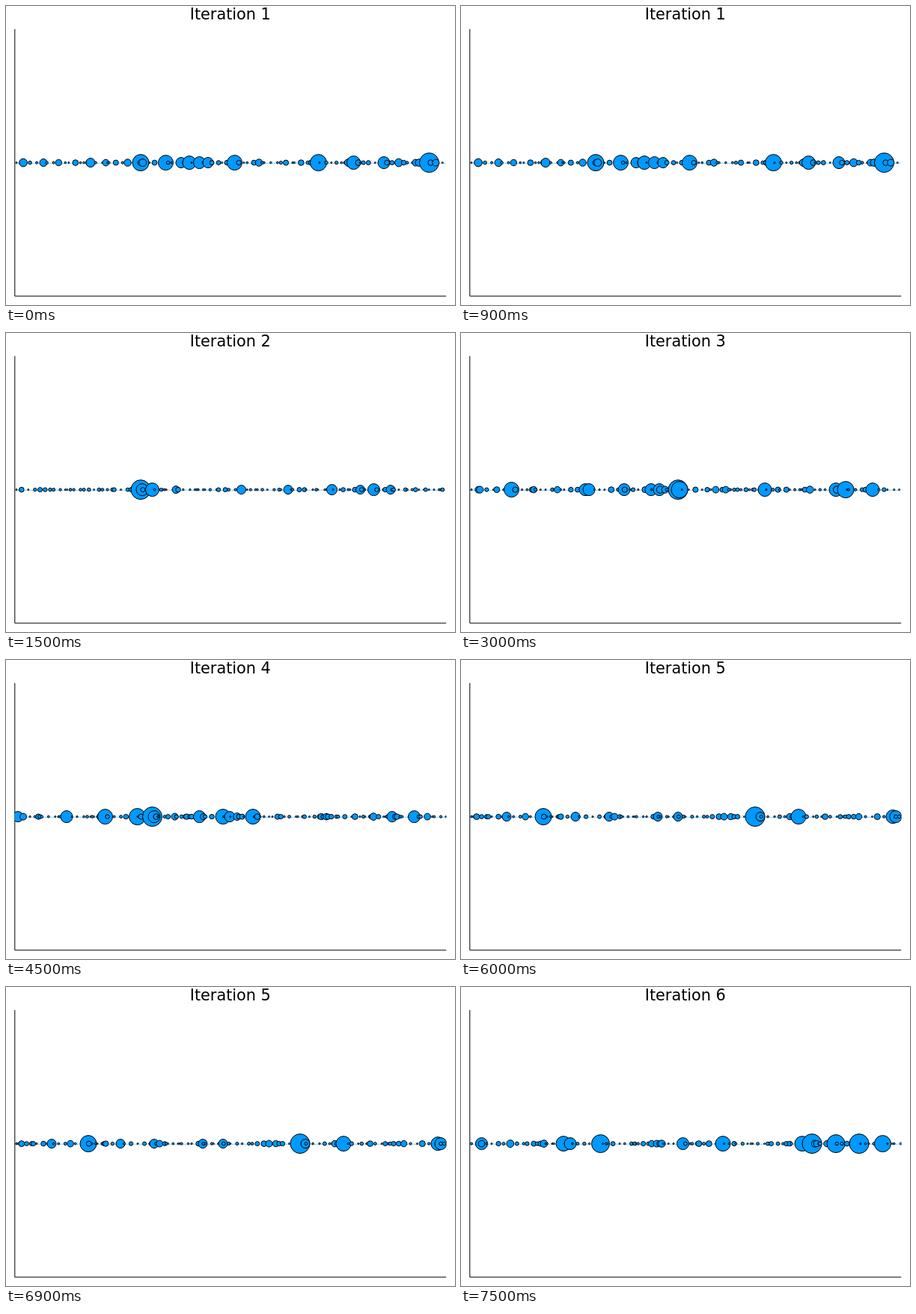
Animation, 600 px wide and 400 px high, one loop 8 s. Source, as an HTML page:

```html
<!DOCTYPE html>
<html lang="en">
<head>
<meta charset="utf-8">
<title>Iterations</title>
<style>
html, body { margin: 0; width: 100%; height: 100%; overflow: hidden; background: #fff; }
svg { display: block; width: 600px; height: 400px; }
text { font: 20.8px "DejaVu Sans", sans-serif; text-anchor: middle; }
.axes { fill: none; stroke: #000; }
.base { stroke: #09f; stroke-dasharray: 1 1.25; }
circle { fill: #09f; stroke: #000; }
</style>
</head>
<body>
<svg viewBox="0 0 600 400">
  <defs><clipPath id="plot"><rect x="11.5" y="31" width="577" height="357"/></clipPath></defs>
  <text id="title" x="299.8" y="18.3"></text>
  <path class="axes" d="M11.8 30.8V388.1H588.2"/>
  <g clip-path="url(#plot)">
    <path class="base" d="M11.8 210.3H588"/>
    <g id="marks"></g>
  </g>
</svg>
<script>
const STEP = 1500, LOOP = 8000;
const LEFT = 11.8, RIGHT = 588, BASE_Y = 209.6, SLOT = 2.25;
const title = document.getElementById("title");
const marks = document.getElementById("marks");

// Dominant circles of each iteration as [x, radius];
// spread is the largest extra radius of the small circles between them.
const iterations = [
  { spread: 4.5, peaks: [[113, 6], [180, 11], [213.5, 10], [234, 7], [245, 9], [258.5, 8], [270, 7], [305.5, 10], [417.5, 11], [464.5, 9], [505, 8], [565.5, 13]] },
  { spread: 2.5, peaks: [[180, 13], [182, 8], [195.5, 9], [227, 5], [314.5, 6], [377, 6], [435.5, 7], [473.5, 6], [491.5, 8], [514, 6]] },
  { spread: 4, peaks: [[67.5, 10], [166, 8], [171, 8], [218, 8], [254, 8], [265, 8], [290, 13], [292, 11], [406, 9], [501, 9], [514, 11], [550, 9]] },
  { spread: 4, peaks: [[16, 7], [81, 8], [132.5, 10], [175.5, 11], [195.5, 13], [198, 8], [258.5, 8], [290, 10], [299, 7], [330, 10], [516, 7], [545.5, 8]] },
  { spread: 3.5, peaks: [[61, 6], [110, 11], [153, 6], [198, 6], [263, 6], [290, 6], [393, 13], [400, 6], [451, 10], [577, 9], [581, 8]] },
  { spread: 4, peaks: [[27.5, 8], [137, 10], [146, 8], [186.5, 12], [296.5, 8], [350, 10], [456, 10], [469, 13], [501, 12], [532, 13], [563.5, 11]] }
];

function seededRandom(seed) {
  return () => (seed = seed * 16807 % 2147483647) / 2147483647;
}

// Small circles sit on a regular grid, one to four slots apart.
function smallCircles(seed, spread) {
  const random = seededRandom(seed);
  const circles = [];
  for (let x = LEFT + SLOT; x < RIGHT; x += SLOT * Math.ceil(random() * 4)) {
    circles.push([x, 1 + spread * random() ** 2]);
  }
  return circles;
}

// Circles further right are painted on top.
const drawings = iterations.map(({ peaks, spread }, i) =>
  [...peaks, ...smallCircles(7919 * (i + 1), spread)]
    .sort((a, b) => a[0] - b[0])
    .map(([x, r]) => `<circle cx="${x}" cy="${BASE_Y}" r="${r}"/>`)
    .join(""));

const start = performance.now();
let shown = -1;
function draw() {
  const index = Math.floor((performance.now() - start) % LOOP / STEP);
  if (index !== shown) {
    shown = index;
    title.textContent = `Iteration ${index + 1}`;
    marks.innerHTML = drawings[index];
  }
  requestAnimationFrame(draw);
}
draw();
</script>
</body>
</html>
```
